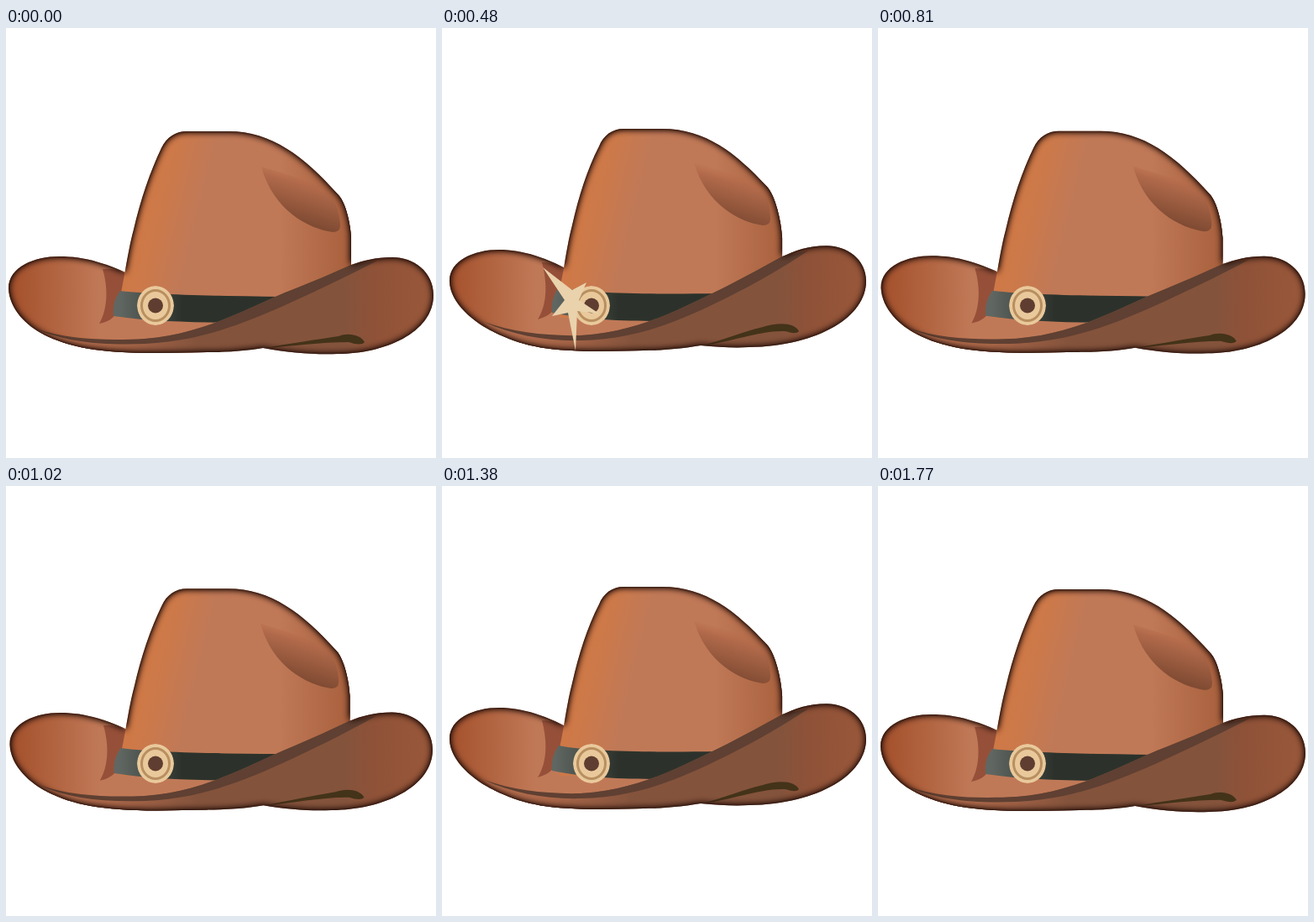
Animation, 512 px wide and 512 px high, one loop 1800 ms. Source, as an HTML page without scripts:

```html
<!DOCTYPE html>
<html lang="en">
<head>
<meta charset="utf-8">
<title>Cowboy hat</title>
<style>
html, body { margin: 0; width: 100%; height: 100%; overflow: hidden; background: #fff; }
svg { display: block; width: 100vw; height: 100vh; }

/* Each part bends between a resting shape and a lifted shape. */
.bend { d: var(--rest); animation: bend .9s infinite; }
@keyframes bend {
  0% { d: var(--rest); animation-timing-function: cubic-bezier(.37, 0, .63, 1); }
  40% { d: var(--lift); animation-timing-function: linear; }
  50% { d: var(--lift); animation-timing-function: cubic-bezier(.37, 0, .63, 1); }
  100% { d: var(--rest); }
}

.back {
  --rest: path("M160 299C120 280 95 272 63 272C35 272 3 284 3 310C4 335 25 355 45 365C75 380 110 387 180 387L240 386L250 345L160 340Z");
  --lift: path("M160 293C125 273 95 264 68 264C38 264 9 277 9 301C9 328 40 352 62 362C95 378 120 384 180 385L240 384L250 345L160 340Z");
}
.fold {
  --rest: path("M115 287Q130 286 142 292L138 315L128 344Q122 350 111 352C121 335 122 310 115 287Z");
  --lift: path("M119 279Q132 279 146 286L141 312L131 338Q125 344 114 347C125 330 126 305 119 279Z");
}
.crown {
  --rest: path("M137 315C143 285 146 262 152 240C160 205 172 170 185 143C191 130 202 123 215 123L265 123C316 123 354 152 396 199C405 209 410 233 411 250L411 310L320 345L137 345Z");
  --lift: path("M140 312C146 285 148 262 155 235C163 200 173 168 187 141C192 128 203 120 216 120L262 120C314 120 350 149 387 189C397 200 404 230 405 250L405 305L320 345L140 345Z");
}
.dent {
  --rest: path("M304 165C325 172 370 182 387 200C395 212 398 228 398 235Q398 243 389 243C360 239 318 217 304 165Z");
  --lift: path("M300 160C320 167 365 176 381 192C389 204 391 220 391 227Q391 235 382 235C354 231 314 210 300 160Z");
}
.band {
  --rest: path("M136 313C180 318 260 319 330 320L260 351C210 350 170 349 128 343Q126 326 136 313Z");
  --lift: path("M139 309C175 317 260 317 328 316L260 349C210 349 172 347 131 339Q129 323 139 309Z");
}
.front {
  --rest: path("M411 282C425 277 440 273 460 273C485 273 509 290 509 318C509 363 450 388 395 388C368 389 338 387 306 381C290 384 265 386 240 386L180 387C110 387 75 380 45 365L36 358C75 374 125 373 165 370C240 364 290 331 345 310Q378 297 411 282Z");
  --lift: path("M405 272C420 265 436 259 458 259C482 259 505 275 505 301C505 343 450 378 365 380C348 381 330 380 308 378C290 381 265 384 240 384L180 385C120 384 95 378 62 362L50 350C85 364 125 368 165 366C240 361 290 331 340 307Q373 290 405 272Z");
}
.lip {
  --rest: path("M36 358C75 372 125 372 165 370C240 364 290 331 345 310Q378 297 411 282L442 277C400 299 365 315 330 331C280 353 230 373 165 376C115 378 70 374 36 358Z");
  --lift: path("M50 350C85 362 125 367 165 366C240 361 290 331 340 307Q373 290 405 272L436 265C395 292 362 310 327 327C280 350 230 371 165 372C125 373 85 366 50 350Z");
}
.crease {
  --rest: path("M308 381C335 376 370 371 396 367C408 362 423 366 427 374Q423 379 408 374C375 374 340 379 308 381Z");
  --lift: path("M310 378C335 371 360 361 381 356C400 350 420 350 425 361Q421 365 410 361C380 359 345 374 310 378Z");
}

.shine { animation: shine 1.8s linear infinite; }
@keyframes shine {
  0%, 5% { transform: translateX(-42px); }
  13.333% { transform: none; }
  20%, 100% { transform: translateX(42px); }
}
.star { transform-origin: 155px 327px; animation: star 1.8s infinite; }
@keyframes star {
  0%, 19% { transform: rotate(-50deg) scale(0); animation-timing-function: ease-out; }
  26.667% { transform: none; animation-timing-function: ease-in; }
  36%, 100% { transform: rotate(50deg) scale(0); }
}
</style>
</head>
<body>
<svg viewBox="0 0 512 512">
  <defs>
    <linearGradient id="backFill" gradientUnits="userSpaceOnUse" x1="10" y1="0" x2="112" y2="0">
      <stop stop-color="#a5522e"/>
      <stop offset=".35" stop-color="#ae5f3b"/>
      <stop offset="1" stop-color="#c07957"/>
    </linearGradient>
    <linearGradient id="crownFill" gradientUnits="userSpaceOnUse" x1="160" y1="220" x2="225" y2="236">
      <stop stop-color="#cf7846"/>
      <stop offset=".3" stop-color="#cd7949"/>
      <stop offset="1" stop-color="#c07957"/>
    </linearGradient>
    <linearGradient id="crownShade" gradientUnits="userSpaceOnUse" x1="325" y1="0" x2="412" y2="0">
      <stop stop-color="#a75f3c" stop-opacity="0"/>
      <stop offset="1" stop-color="#a75f3c"/>
    </linearGradient>
    <linearGradient id="dentFill" gradientUnits="userSpaceOnUse" x1="358" y1="174" x2="342" y2="228">
      <stop stop-color="#b96f4b" stop-opacity="0"/>
      <stop offset=".25" stop-color="#b0694a"/>
      <stop offset="1" stop-color="#804b33"/>
    </linearGradient>
    <linearGradient id="bandFill" gradientUnits="userSpaceOnUse" x1="135" y1="0" x2="210" y2="0">
      <stop stop-color="#606762"/>
      <stop offset="1" stop-color="#2c322b"/>
    </linearGradient>
    <linearGradient id="frontFill" gradientUnits="userSpaceOnUse" x1="60" y1="0" x2="500" y2="0">
      <stop stop-color="#b9704f"/>
      <stop offset=".16" stop-color="#aa6749"/>
      <stop offset=".38" stop-color="#84533c"/>
      <stop offset=".78" stop-color="#84533c"/>
      <stop offset=".86" stop-color="#8f5238"/>
      <stop offset="1" stop-color="#98573a"/>
    </linearGradient>
    <filter id="rim" filterUnits="userSpaceOnUse" x="-20" y="60" width="552" height="380" color-interpolation-filters="sRGB">
      <feComponentTransfer in="SourceAlpha"><feFuncA type="table" tableValues="1 0"/></feComponentTransfer>
      <feGaussianBlur stdDeviation="4.2"/>
      <feComponentTransfer result="edge"><feFuncA type="linear" slope="1.9"/></feComponentTransfer>
      <feFlood flood-color="#2c140d"/>
      <feComposite in2="edge" operator="in"/>
      <feComposite in2="SourceAlpha" operator="in" result="shadow"/>
      <feMerge><feMergeNode in="SourceGraphic"/><feMergeNode in="shadow"/></feMerge>
    </filter>
    <clipPath id="badge"><ellipse cx="178" cy="330.5" rx="22" ry="23.5"/></clipPath>
  </defs>

  <g filter="url(#rim)">
    <path class="bend back" fill="url(#backFill)"/>
    <path class="bend fold" fill="#965039"/>
    <path class="bend crown" fill="url(#crownFill)"/>
    <path class="bend crown" fill="url(#crownShade)"/>
    <path class="bend dent" fill="url(#dentFill)"/>
    <path class="bend band" fill="url(#bandFill)"/>
    <path class="bend front" fill="url(#frontFill)"/>
    <path class="bend lip" fill="#5f4032"/>
    <path class="bend crease" fill="#433319"/>
  </g>

  <g clip-path="url(#badge)">
    <ellipse cx="178" cy="330.5" rx="22" ry="23.5" fill="#e9c99b"/>
    <ellipse cx="178" cy="330.5" rx="16.5" ry="18" fill="none" stroke="#b98f60" stroke-width="3"/>
    <circle cx="178" cy="330.5" r="9" fill="#5f3d30"/>
    <g class="shine" fill="#fbeacb">
      <path d="M176 305H188L194 356H181Z"/>
      <path d="M157 305H160L166 356H163Z"/>
    </g>
  </g>
  <path class="star" fill="#e9d2ac" d="M120 285L155 312L172 303L163 324L187 340L161 337L159 384L150 339L131 343L146 324Z"/>
</svg>
</body>
</html>
```
